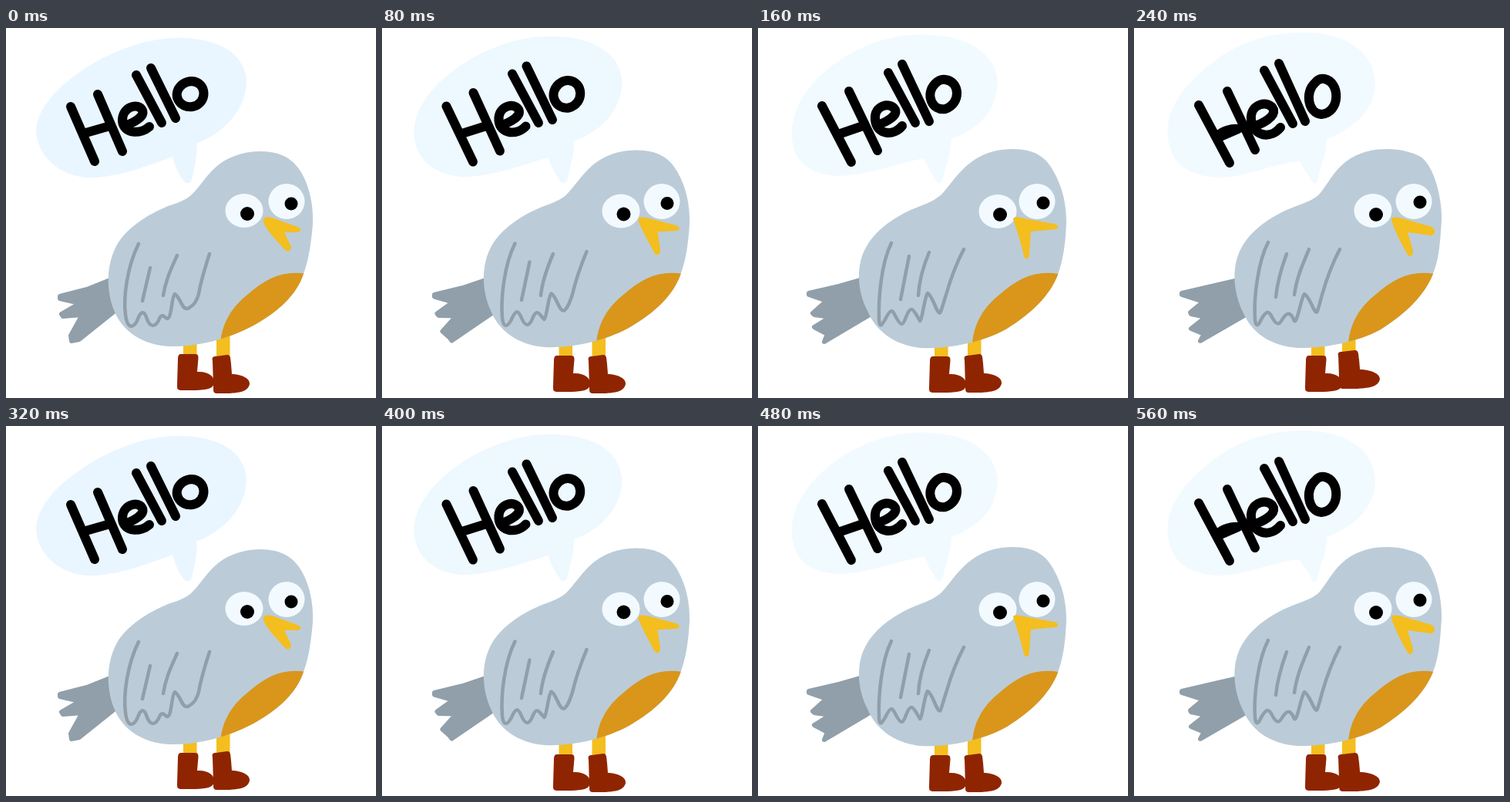
Recreate the animation shown at these times as an HTML page. Size 480 by 480 pixels, loop 0.64 s.

```html
<!DOCTYPE html>
<html lang="en">
<head>
<meta charset="utf-8">
<title>Hello bird</title>
<style>
html, body { margin: 0; width: 100%; height: 100%; overflow: hidden; background: #fff; }
svg { display: block; width: 100%; height: 100%; }
.pose { visibility: hidden; animation: show 640ms step-end infinite; }
@keyframes show { 0% { visibility: visible; } 12.5%, 100% { visibility: hidden; } }
.line { fill: none; stroke-linecap: round; stroke-linejoin: round; }
.ink { stroke: #000; stroke-width: 12; }
.feather { stroke: #909fa9; stroke-width: 4.5; }
.tail { fill: #909fa9; stroke: #909fa9; stroke-width: 6; stroke-linejoin: round; }
.body { fill: #bbccd8; }
.chest { fill: #d9961b; }
.eye { fill: #f2faff; }
.beak, .leg { fill: #f3be1e; }
.boot { fill: #8f2500; }
</style>
</head>
<body>
<svg id="stage" viewBox="0 0 480 480" role="img" aria-label="Bird saying Hello"></svg>
<script>
const small = {
  tint: '233 246 255',
  bubble: 'M40 142C34 112 63 80 92 60C132 31 184 11 232 13C276 15 309 32 312 68C312 104 285 135 247 150C249 162 245 180 241 196C240 203 232 203 229 196C223 188 219 178 216 167C180 180 144 195 103 194C70 190 46 170 40 142Z',
  hello: 'M84 102L115 173M119 86L151 160M100 137L135 127M153 127C166 123 180 115 177 107C172 96 150 102 151 121C153 138 175 138 186 128M169 61L202 123M188 52L220 117M229 73C213 86 226 105 242 102C262 98 261 70 241 69C236 69 232 71 229 73',
  tail: 'M140 325L105 339L70 348L70 351L96 357L72 371L74 374L99 372L84 399L85 406L95 404L140 368Z',
  body: 'M330 160C358 160 374 171 384 189C394 207 399 230 398 254C396 278 393 300 386 319C377 346 354 368 319 387C285 405 245 414 212 413C175 411 150 392 140 366C130 340 130 308 143 283C156 259 184 242 210 231C223 227 233 223 240 217C254 204 262 186 282 173C297 164 313 160 330 160Z',
  wing: 'M172 280C157 310 152 350 155 372C157 389 164 391 170 380C175 366 179 367 182 375C187 391 195 388 200 375C204 369 208 380 211 376C215 372 215 348 219 345C223 347 226 355 229 360C232 365 236 365 239 362C245 359 248 352 250 345C253 327 258 312 264 293M187 311L177 354M222 295C214 313 207 327 204 347',
  beak: 'M334 252C332 246 338 244 345 246L375 257C384 259 385 264 377 265L361 265L370 284C370 290 365 291 361 287C350 274 339 264 334 252Z',
  eyes: '309 237 364 225 313 241 370 228',
  legs: '230 273',
  boot: '267 1'
};

const wide = {
  tint: '241 250 255',
  bubble: 'M44 142C41 108 64 72 100 46C136 20 180 6 222 9C270 10 308 32 311 70C310 104 290 130 251 144C250 164 243 180 240 195C238 204 232 203 229 195C223 185 220 180 215 169C177 177 140 192 102 192C66 189 47 174 44 142Z',
  hello: 'M83 101L121 174M118 82L155 159M104 138L139 126M154 126C167 122 181 114 178 106C172 95 150 100 152 119C154 140 177 140 187 127M169 58L204 123M187 47L222 121M230 72C216 86 226 108 243 105C264 98 262 69 243 67C238 66 234 68 230 72',
  tail: 'M140 325L105 335L66 344L66 346L89 354L71 370L73 372L94 375L73 388L90 397L86 407L145 372Z',
  body: 'M330 157C360 157 374 168 384 187C395 207 400 228 400 252C399 280 396 300 389 320C378 348 355 370 323 390C288 410 240 417 210 415C176 411 152 392 142 367C128 340 127 306 141 283C155 259 182 242 208 232C222 227 231 222 238 216C252 201 262 182 284 169C297 161 313 157 330 157Z',
  wing: 'M173 279C160 305 156 350 157 379C158 390 161 385 165 378C173 362 174 366 179 375C186 388 188 386 192 375C199 357 202 366 210 380C213 379 216 349 220 344C224 346 227 354 230 361C233 368 236 372 237 368C239 363 241 355 244 346C250 325 258 304 267 287M196 296L185 352M222 291C214 310 209 328 208 347',
  beak: 'M331 248C331 244 337 245 345 247L384 254C390 255 391 260 386 261L354 264L352 292C352 300 348 302 345 296C341 278 336 263 331 248Z',
  eyes: '311 238 362 225 314 242 370 227',
  legs: '229 272',
  boot: '267 1'
};

const closing = {
  tint: '241 250 255',
  bubble: 'M44 141C40 108 64 74 98 48C134 18 180 4 228 6C274 8 312 30 313 72C312 104 290 128 250 144C250 166 241 180 239 194C238 205 231 203 229 195C223 186 220 182 215 173C178 176 148 194 106 194C66 190 47 174 44 141Z',
  hello: 'M84 100L124 175M121 82L157 158M108 140C116 133 127 130 135 131L112 141M154 128C168 124 183 115 181 106C176 93 150 97 152 119C155 142 178 144 190 129M169 55L206 124M188 46L222 121M235 71C221 83 226 111 243 112C268 110 268 70 247 66C242 65 238 67 235 71',
  tail: 'M140 326L105 334L62 344L62 346L90 355L73 369L74 371L93 375L74 390L91 397L86 406L145 372Z',
  body: 'M328 157C347 157 363 162 372 167C390 180 400 222 399 250C397 280 396 298 388 319C377 347 352 371 320 391C288 409 240 416 212 415C174 412 152 393 142 370C128 342 126 308 140 284C154 259 182 242 208 232C222 227 234 222 240 216C252 203 260 181 283 168C297 160 313 157 328 157Z',
  wing: 'M174 278C161 303 155 350 157 378C158 390 162 385 165 378C172 366 175 367 179 375C186 388 189 384 193 377C200 367 204 370 208 380C212 383 217 349 221 345C225 347 228 354 231 360C234 367 237 371 238 367C240 361 242 354 244 346C250 325 258 304 267 287M198 293C191 312 186 329 184 349M227 287C219 306 211 324 208 346',
  beak: 'M334 250C333 244 341 245 348 247L383 257C392 259 393 269 384 269L355 265L362 289C362 296 358 298 355 294C346 279 339 264 334 250Z',
  eyes: '310 237 363 225 314 242 371 226',
  legs: '230 270',
  boot: '264 1.12'
};

// Halfway drawing between two poses that share the same path commands.
const halfway = (a, b) => Object.fromEntries(Object.keys(a).map(key => {
  const other = b[key].match(/[\d.]+/g);
  let i = 0;
  return [key, a[key].replace(/[\d.]+/g, n => (+n + +other[i++]) / 2)];
}));

const poses = [small, halfway(small, wide), wide, closing];
const leftBootY = [422, 424, 425, 424, 423, 425, 426, 425];
const rightBootY = [424, 424, 423, 418, 422, 425, 425, 424];

const leftBoot = 'M226 1L245 1C250 1 250 4 249 12L248 24C262 23 271 30 270 38C269 47 260 47 246 48L228 48C222 48 222 46 222 41L223 8C223 3 224 2 226 1Z';
const rightBoot = 'M5 2L20 0C25 0 24 6 25 12L26 25C37 25 50 30 49 38C47 48 35 49 23 50L7 50C2 50 2 48 2 42L1 8C0 4 1 2 5 2Z';
const chest = 'M278 412C279 385 292 363 312 347C338 323 362 314 390 319L402 420H278Z';

const path = (cls, d, extra = '') => `<path class="${cls}" d="${d}" ${extra}/>`;
const oval = (cls, x, y, rx, ry = rx) => `<ellipse class="${cls}" cx="${x}" cy="${y}" rx="${rx}" ry="${ry}"/>`;

function drawPose(step) {
  const p = poses[step % 4];
  const eye = p.eyes.split(' ');
  const legs = p.legs.split(' ');
  const [bootX, bootScale] = p.boot.split(' ');
  return `<g class="pose" style="animation-delay:${step * 80 - 640}ms">
    <clipPath id="torso${step}"><path d="${p.body}"/></clipPath>
    ${path('', p.bubble, `fill="rgb(${p.tint})"`)}
    ${path('line ink', p.hello)}
    ${path('tail', p.tail)}
    ${legs.map(x => `<rect class="leg" x="${x}" y="395" width="17.5" height="34"/>`).join('')}
    ${path('boot', leftBoot, `transform="translate(0 ${leftBootY[step]})"`)}
    ${path('boot', rightBoot, `transform="translate(${bootX} ${rightBootY[step]}) scale(${bootScale} 1)"`)}
    ${path('body', p.body)}
    ${path('chest', chest, `clip-path="url(#torso${step})"`)}
    ${path('line feather', p.wing)}
    ${oval('eye', eye[0], eye[1], 24.5, 22)}
    ${oval('eye', eye[2], eye[3], 23.5, 23)}
    ${oval('pupil', eye[4], eye[5], 9)}
    ${oval('pupil', eye[6], eye[7], 8.5)}
    ${path('beak', p.beak)}
  </g>`;
}

document.getElementById('stage').innerHTML = leftBootY.map((_, step) => drawPose(step)).join('');
</script>
</body>
</html>
```
